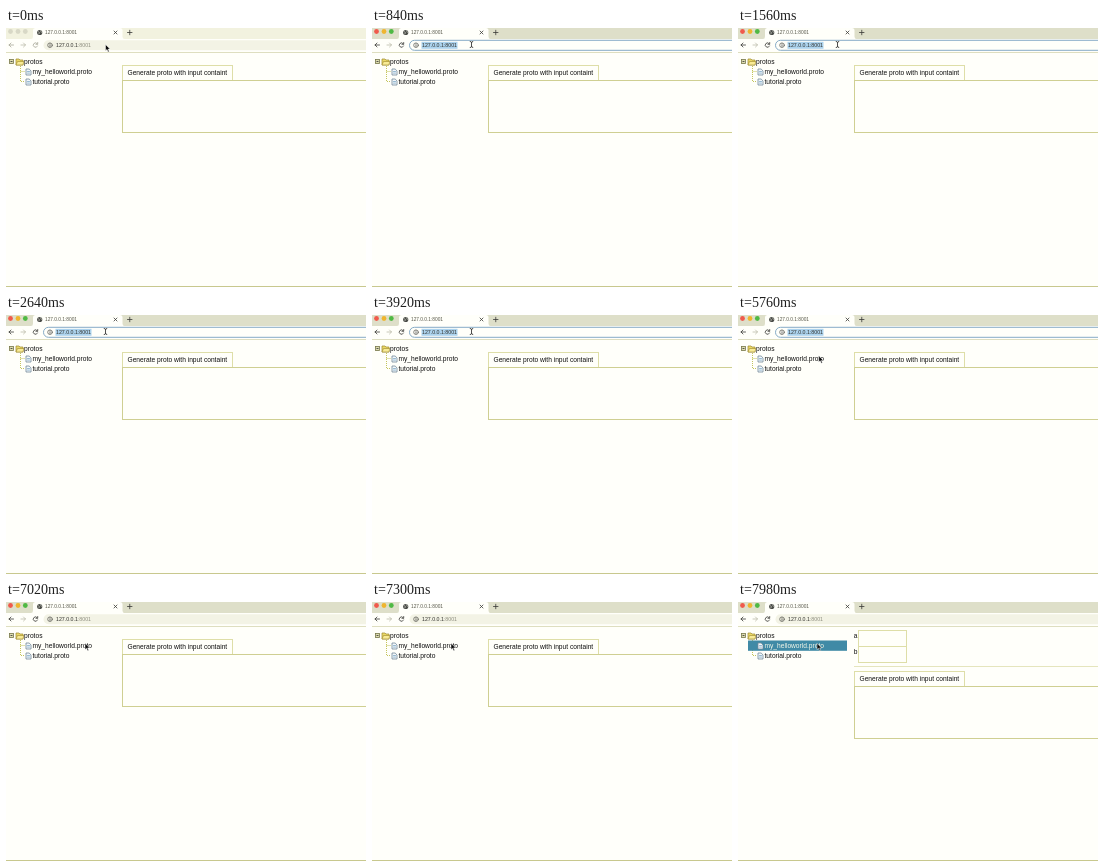
These frames come from a looping animation (360 px wide and 259 px high, 8 s). An HTML page:

```html
<!DOCTYPE html>
<html lang="en">
<head>
<meta charset="utf-8">
<title>Proto browser</title>
<style>
  html, body { margin: 0; width: 100%; height: 100%; overflow: hidden; background: #fffffa; }
  svg { display: block; width: 360px; height: 259px; }
  text { font-family: "Liberation Sans", Arial, sans-serif; font-size: 6.65px; fill: #111; }
  .line { fill: none; stroke-width: .8; stroke: #3c3c38; stroke-linecap: round; stroke-linejoin: round; }
  .tabTitle { font-size: 4.8px; fill: #555548; }
  .url { font-size: 5.25px; fill: #30302c; }
  .box { fill: #fffffa; stroke: #dedea8; stroke-width: 1; }
  .rule { fill: none; stroke: #cfcf92; stroke-width: 1; }
  .twig { fill: none; stroke: #c4c45c; stroke-width: 1; stroke-dasharray: 1 1; }
</style>
</head>
<body>
<svg viewBox="0 0 360 259">
  <defs>
    <g id="file">
      <path d="M.5 .5H3.6L5.5 2.4V6.5H.5Z" fill="#f4f8fa" stroke="#71899a" stroke-width=".8"/>
      <path d="M1.6 3H4.4M1.6 4.6H4.4" stroke="#6f9fc0" stroke-width=".7"/>
    </g>
  </defs>

  <rect id="strip" width="360" height="11"/>
  <g id="lights">
    <circle cx="4.5" cy="3.5" r="2.4"/><circle cx="12" cy="3.5" r="2.4"/><circle cx="19.3" cy="3.5" r="2.4"/>
  </g>
  <path d="M25 11Q27 11 27 8.5V2.5Q27 0 29.5 0H114Q116.500 0 116.500 2.500V8.500Q116.500 11 118.500 11Z" fill="#fffffa"/>
  <circle cx="33.700" cy="4.500" r="2.600" fill="#4a4c48"/>
  <path d="M32 3.5L33.500 4.600L32.800 6M34.600 2.800L35.400 4.300" class="line" style="stroke:#e4e4d8;stroke-width:.6"/>
  <text x="39" y="6.300" class="tabTitle">127.0.0.1:8001</text>
  <path d="M108 3L111 6M111 3L108 6" class="line"/>
  <path d="M121.500 4.500H126M123.750 2.250V6.750" class="line"/>

  <rect y="11" width="360" height="13" fill="#fffffa"/>
  <path id="back" d="M7.500 17H3M5 15L3 17L5 19" class="line"/>
  <path d="M15 17H19.500M17.500 15L19.500 17L17.500 19" class="line" style="stroke:#bcbcaa"/>
  <path id="reload" d="M31.300 15.800A2.200 2.200 0 1 0 31.500 18M31.700 14.500V16.300H29.900" class="line"/>
  <rect id="field" x="37.500" y="12.300" width="340" height="10" rx="5"/>
  <circle cx="44" cy="17.200" r="2.300" class="line" style="stroke:#55554e;stroke-width:.7"/>
  <path d="M44 16.900V18.400M44 15.800V15.900" class="line" style="stroke-width:.7"/>
  <rect id="picked" x="49.500" y="13.800" width="36" height="7" fill="#acd3ee"/>
  <text x="50" y="19.200" class="url">127.0.0.1<tspan id="port">:8001</tspan></text>
  <path d="M0 24.500H360" stroke="#dedec0" stroke-width="1"/>

  <path d="M14.500 38V53.500H19M14.500 43.500H19" class="twig"/>
  <rect x="3.500" y="31.500" width="4" height="4" fill="#deddb0" stroke="#77774a" stroke-width=".8"/>
  <path d="M4.500 33.500H6.500" stroke="#333" stroke-width=".8"/>
  <path d="M10 31H13L14 32H17V37H10Z" fill="#ead867" stroke="#9c872d" stroke-width=".7"/>
  <path d="M10 37L11.500 33.500H18L16.800 37Z" fill="#f8eb96" stroke="#9c872d" stroke-width=".6"/>
  <text x="18" y="36">protos</text>
  <rect id="row" x="10" y="38.500" width="99" height="10.300" fill="#408aa6"/>
  <use href="#file" x="19.500" y="40.500"/>
  <text id="rowName" x="26.500" y="46">my_helloworld.proto</text>
  <use href="#file" x="19.500" y="50.500"/>
  <text x="26.500" y="56">tutorial.proto</text>

  <g id="fields">
    <text x="115.700" y="36">a</text>
    <rect x="120.500" y="28.500" width="48" height="16" class="box"/>
    <text x="115.700" y="52">b</text>
    <rect x="120.500" y="44.500" width="48" height="16" class="box"/>
    <path d="M116 64.500H360" stroke="#e5e5bd"/>
  </g>
  <g id="form">
    <rect x="116.500" y="37.500" width="110" height="15" class="box"/>
    <text x="121.500" y="47">Generate proto with input containt</text>
    <rect x="116.500" y="52.500" width="260" height="52" class="rule"/>
  </g>
  <path d="M0 258.500H360" stroke="#c8c88e"/>

  <path id="arrow" d="M0 0V6.300L1.500 5L2.600 7.500L3.700 7L2.600 4.600H4.600Z" fill="#080808" stroke="#fff" stroke-width=".5"/>
  <path id="beam" d="M-1.300 -3Q0 -3 0 -2V2Q0 3 -1.300 3M1.300 -3Q0 -3 0 -2M0 2Q0 3 1.300 3" class="line" style="stroke:#222"/>
</svg>
<script>
  const LOOP = 8000;
  const FOCUS = 580, LEAVE_FIELD = 4760, BLUR = 7020, OPEN = 7420;
  const path = [
    [0, 99.5, 16.5], [4640, 99.5, 16.5], [4920, 95.5, 22.5],
    [5440, 83, 42], [5760, 80.7, 40.8], [6280, 80, 41], [6440, 79, 41.3], [LOOP, 79, 41.3]
  ];
  const $ = id => document.getElementById(id);
  const show = (id, on) => { $(id).style.display = on ? '' : 'none'; };
  const paint = (id, fill) => { $(id).style.fill = fill; };
  const lamps = [...$('lights').children];
  const lampColors = ['#f05a4c', '#efb52f', '#4fb944'];

  function pointerAt(t) {
    const i = path.findIndex(key => key[0] > t);
    const [t0, x0, y0] = path[i - 1], [t1, x1, y1] = path[i];
    const k = (t - t0) / (t1 - t0);
    return [x0 + (x1 - x0) * k, y0 + (y1 - y0) * k];
  }

  function render(t) {
    const active = t >= FOCUS;
    const editing = active && t < BLUR;
    const opened = t >= OPEN;
    const typing = active && t < LEAVE_FIELD;

    paint('strip', active ? '#dedfc9' : '#f2f2df');
    lamps.forEach((lamp, i) => { lamp.style.fill = active ? lampColors[i] : '#d8d8c6'; });
    for (const id of ['back', 'reload']) $(id).style.stroke = active ? '#3c3c38' : '#a8a898';

    paint('field', editing ? '#fffffa' : '#f3f3e5');
    $('field').style.stroke = editing ? '#86abc7' : 'none';
    show('picked', editing);
    paint('port', editing ? '#30302c' : '#8b8b7c');

    show('row', opened);
    paint('rowName', opened ? '#f4f8e8' : '#111');
    show('fields', opened);
    $('form').setAttribute('transform', `translate(0 ${opened ? 32 : 0})`);

    const [x, y] = pointerAt(t);
    show('beam', typing);
    show('arrow', !typing);
    $(typing ? 'beam' : 'arrow').setAttribute('transform', `translate(${x} ${y})`);
  }

  const start = performance.now();
  function tick() {
    render((performance.now() - start) % LOOP);
    requestAnimationFrame(tick);
  }
  tick();
</script>
</body>
</html>
```
